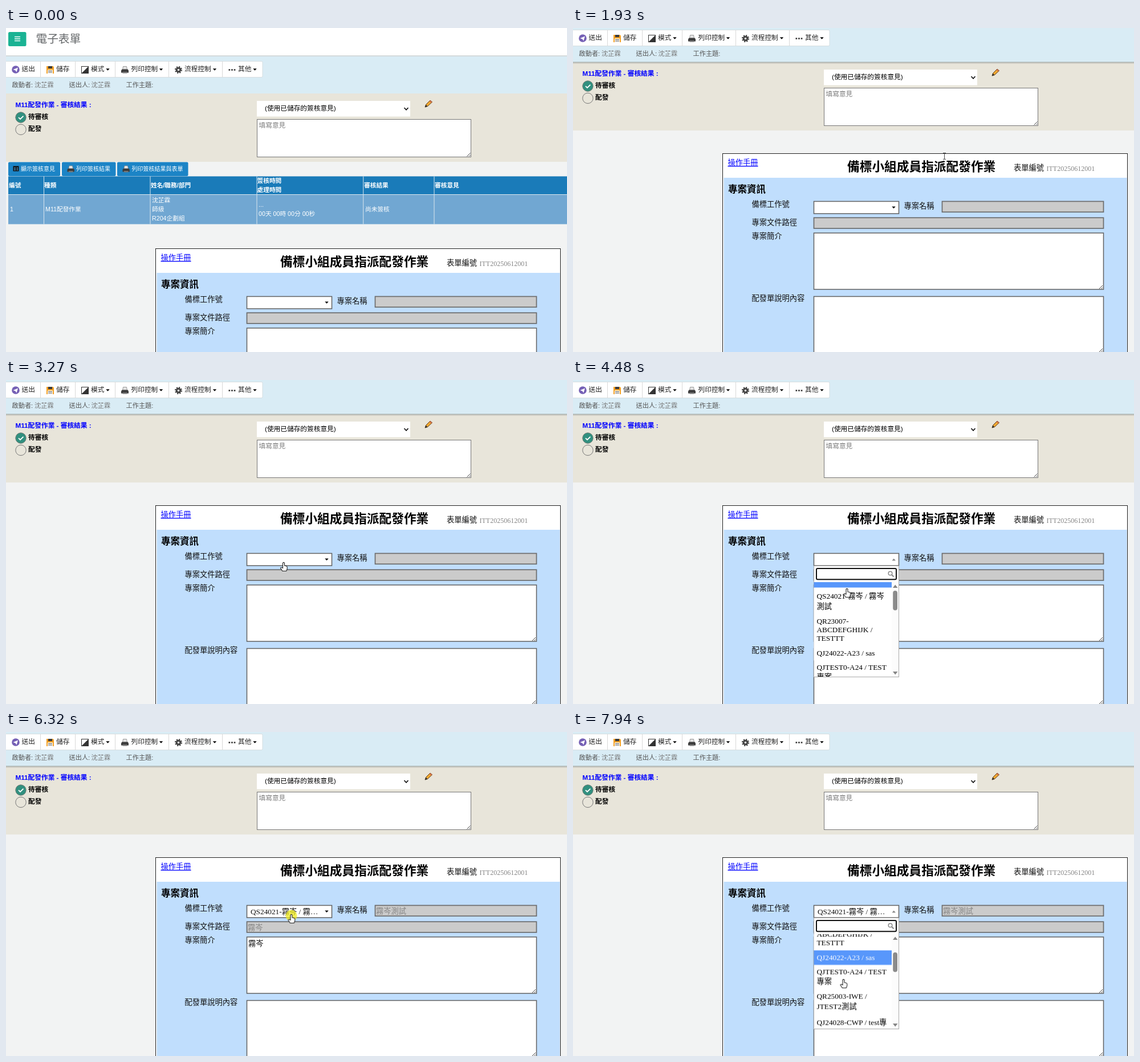
These frames come from a looping animation (984x569 px, 8000 ms). An HTML page:

```html
<!DOCTYPE html>
<html lang="zh-Hant">
<head>
<meta charset="utf-8">
<title>電子表單</title>
<style>
html,body{margin:0;width:100%;height:100%;overflow:hidden;background:#f2f3f3}
svg{display:block}
#stage{width:100vw;height:100vh}
text{font:11.7px "Liberation Sans","Noto Sans CJK TC","Noto Sans CJK SC","Noto Sans CJK JP","Noto Sans CJK",sans-serif;fill:#222;white-space:pre}
.b text,text.b{font-weight:700}
.head text{transform:translateY(-.5px)}
.info text{font-size:11.2px;fill:#555}
.info .name{fill:#777}
.small text{font-size:10px;fill:#fff}
.cells text{font-size:10.7px;fill:#fff}
.form text{font-size:13.25px;fill:#111}
.form .serif,.list text{font-size:13.3px;font-family:"Liberation Serif","Noto Sans CJK TC","Noto Sans CJK SC","Noto Sans CJK JP","Noto Sans CJK",serif}
.form .faint{fill:#858585;font-weight:300}
.field{fill:#fff;stroke:#626262;stroke-width:1.5}
.locked{fill:#cbcbcb;stroke:#6c6c6c;stroke-width:1.7}
.line{fill:none;stroke:#4a4a4a}
.row rect{fill:var(--bg,#fff)}
.row text{fill:var(--ink,#000)}

/* 1% is 80 ms */
.page,.head,.cursor,.scroll,.thumb{animation:8s linear infinite}
.page{animation-name:page}
.head{animation-name:head}
.cursor{animation-name:cursor}
.scroll{animation-name:scroll}
.thumb{animation-name:thumb}
.shadow,.menu,.picked,.filled,.arrow,.beam,.hand,.click,.row{animation:8s step-end infinite}
.shadow{animation-name:stuck}
.menu{animation-name:menu}
.picked{animation-name:picked}
.filled{animation-name:filled}
.arrow{animation-name:arrow}
.beam{animation-name:beam}
.hand{animation-name:hand}
.click{animation-name:click}
.r1{animation-name:r1}
.r2{animation-name:r2}
.r3{animation-name:r3}
.r4{animation-name:r4}

@keyframes page{
  0%,16.25%{transform:translateY(0);animation-timing-function:ease-in-out}
  18.25%,19.2%{transform:translateY(-80px)}
  19.25%,21.2%{transform:translateY(-83px);animation-timing-function:ease-in-out}
  24.125%,100%{transform:translateY(-167px)}
}
@keyframes head{
  0%,16.25%{transform:translateY(0);animation-timing-function:ease-in-out}
  18.25%,19.24%{transform:translateY(-80px)}
  19.25%,100%{transform:translateY(-55px)}
}
@keyframes cursor{
  0%,2.5%{transform:translate(624px,17px)}
  4.875%,6.4%{transform:translate(645px,197px)}
  7.375%,10.5%{transform:translate(650px,197px)}
  15%,27.2%{transform:translate(651px,225px)}
  32.25%,34.5%{transform:translate(590px,262px)}
  40.875%,41.6%{transform:translate(487px,320px)}
  43.375%,52.5%{transform:translate(486px,317px)}
  56%,56.8%{transform:translate(480.5px,366px)}
  57.625%,66.7%{transform:translate(479px,387px)}
  70.875%,74.1%{transform:translate(491px,366px)}
  74.125%,76.4%{transform:translate(494px,327px)}
  77.25%,85.6%{transform:translate(500.5px,320px)}
  88.5%,89.2%{transform:translate(497px,340px)}
  96.25%,100%{transform:translate(474.5px,434px)}
}
@keyframes scroll{
  0%,96.25%{transform:translateY(0);animation-timing-function:ease-in-out}
  99.25%,100%{transform:translateY(-83.5px)}
}
@keyframes thumb{
  0%,96.25%{transform:translateY(0);animation-timing-function:ease-in-out}
  99.25%,100%{transform:translateY(17px)}
}
@keyframes stuck{0%{opacity:0}19.25%,100%{opacity:1}}
@keyframes menu{0%{opacity:0}46.75%{opacity:1}61.875%{opacity:0}80.625%,100%{opacity:1}}
@keyframes picked{0%{opacity:0}61.875%,100%{opacity:1}}
@keyframes filled{0%{opacity:0}67.625%,100%{opacity:1}}
@keyframes arrow{0%{opacity:0}2.5%{opacity:1}4.4%{opacity:0}27.375%{opacity:1}39.4%{opacity:0}74.125%{opacity:1}76.5%,100%{opacity:0}}
@keyframes beam{0%{opacity:0}4.4%{opacity:1}27.375%{opacity:0}61.875%{opacity:1}74.125%{opacity:0}87.5%{opacity:1}90.4%,100%{opacity:0}}
@keyframes hand{0%{opacity:0}39.4%{opacity:1}61.875%{opacity:0}76.5%{opacity:1}87.5%{opacity:0}90.4%,100%{opacity:1}}
@keyframes click{0%{opacity:0}44.875%{opacity:1}47.5%{opacity:0}60.125%{opacity:1}62%{opacity:0}79%{opacity:1}80.7%,100%{opacity:0}}
@keyframes r1{0%{--bg:#5897fb}56.875%{--bg:#ddd}62.5%,100%{--bg:#fff}}
@keyframes r2{0%{--bg:#fff;--ink:#000}56.875%{--bg:#5897fb;--ink:#fff}93.75%,100%{--bg:#ddd;--ink:#000}}
@keyframes r3{0%{--bg:#fff;--ink:#000}93.75%{--bg:#5897fb;--ink:#fff}97.5%,100%{--bg:#fff;--ink:#000}}
@keyframes r4{0%{--bg:#fff;--ink:#000}97.5%,100%{--bg:#5897fb;--ink:#fff}}
</style>
</head>
<body>
<svg id="stage" viewBox="0 0 984 569">
<defs>
  <clipPath id="listClip"><rect x="422.5" y="355" width="149" height="166"/></clipPath>
  <linearGradient id="fade" x2="0" y2="1"><stop stop-color="#8b9290" stop-opacity=".75"/><stop offset="1" stop-color="#999" stop-opacity="0"/></linearGradient>
  <g id="printer">
    <path d="M3.5 .5H9.5L10.5 6H2.5Z" fill="#e4e4e4" stroke="#777" stroke-width=".7"/>
    <path d="M1.5 5.500H11.500L13 7.500V11.500H0V7.500Z" fill="#3c3c3c"/>
    <path d="M2.500 10H10.500V12.500H2.500Z" fill="#777"/>
  </g>
  <path id="caret" d="M-3.2 -1.7H3.2L0 1.7Z"/>
  <path id="grip" d="M-7 -1L-1 -7M-3.5 -1L-1 -3.5" stroke="#444" fill="none"/>
</defs>

<g class="page">
  <!-- review history -->
  <g fill="#1c84c6">
    <rect x="4" y="235.500" width="91" height="24.500" rx="2"/>
    <rect x="98" y="235.500" width="94.500" height="24.500" rx="2"/>
    <rect x="195" y="235.500" width="124.500" height="24.500" rx="2"/>
  </g>
  <rect x="12.500" y="242.500" width="10" height="9" fill="#111"/>
  <path d="M14 246H17M18.500 246H21M14 249H17M18.500 249H21" stroke="#5aa6d8" stroke-width="1.300"/>
  <use href="#printer" transform="translate(107.500 241.500)scale(.95)"/>
  <use href="#printer" transform="translate(204.500 241.500)scale(.95)"/>
  <g class="small">
    <text x="26" y="250.700">顯示簽核意見</text>
    <text x="123" y="250.700">列印簽核結果</text>
    <text x="220.500" y="250.700">列印簽核結果與表單</text>
  </g>
  <rect x="4" y="260.500" width="980" height="32" fill="#1a7bb9"/>
  <rect x="4" y="292" width="980" height="52.500" fill="#71a7d2"/>
  <path d="M4 292.500H984M66.500 260.500V344.500M253 260.500V344.500M440 260.500V344.500M626.700 260.500V344.500M751 260.500V344.500" stroke="#dde7ee"/>
  <g class="cells b">
    <text x="5" y="280">編號</text><text x="67" y="280">種類</text>
    <text x="254" y="280">姓名/職務/部門</text>
    <text x="440.500" y="272">簽核時間</text><text x="440.500" y="287.500">處理時間</text>
    <text x="628" y="280">審核結果</text><text x="752" y="280">審核意見</text>
  </g>
  <g class="cells">
    <text x="7" y="322">1</text><text x="69" y="322">M11配發作業</text>
    <text x="256" y="306">沈芷霖</text><text x="256" y="322">師級</text><text x="256" y="337.500">R204企劃組</text>
    <text x="443" y="314">...</text><text x="443" y="329.500">00天 00時 00分 00秒</text>
    <text x="630" y="322">尚未簽核</text>
  </g>

  <!-- form -->
  <g class="form">
    <rect x="262.500" y="387.500" width="710" height="420" fill="#fff" stroke="#222"/>
    <rect x="264.500" y="430" width="707" height="380" fill="#c0defd"/>
    <text x="271.500" y="408" style="fill:#00f" text-decoration="underline">操作手冊</text>
    <text class="b" x="481" y="417.700" style="font-size:21.7px;fill:#000">備標小組成員指派配發作業</text>
    <text x="773" y="417">表單編號</text>
    <text class="serif faint" x="830.500" y="417.500" style="font-size:12px">ITT20250612001</text>
    <text class="b" x="272" y="456" style="font-size:16.5px;fill:#000">專案資訊</text>
    <text x="313.500" y="481">備標工作號</text>
    <text x="580.500" y="484">專案名稱</text>
    <text x="313.500" y="513">專案文件路徑</text>
    <text x="313.500" y="537">專案簡介</text>
    <text x="313.500" y="646">配發單說明內容</text>
    <rect class="field" x="422.500" y="471.500" width="149" height="21.500"/>
    <use href="#caret" x="562.500" y="482.300"/>
    <rect class="locked" x="647.500" y="471.500" width="283" height="18.700"/>
    <rect class="locked" x="422.500" y="500.200" width="508" height="18.700"/>
    <rect class="field" x="422.500" y="527" width="508" height="99"/>
    <rect class="field" x="422.500" y="638.500" width="508" height="98.500"/>
    <use href="#grip" x="930" y="626"/><use href="#grip" x="930" y="737"/>
    <text class="serif picked" x="429" y="487">QS24021-霧岑 / 霧…</text>
    <g class="filled">
      <text class="faint" x="649" y="486">霧岑測試</text>
      <text class="faint" x="424" y="515">霧岑</text>
      <text x="425" y="543">霧岑</text>
    </g>
  </g>
</g>

<g class="head">
  <rect width="984" height="49" fill="#fff"/>
  <rect y="48" width="984" height="2.500" fill="#d5dadc"/>
  <rect y="50" width="984" height="65" fill="#d9ecf5"/>
  <rect y="115" width="984" height="120" fill="#e8e5da"/>
  <rect class="shadow" y="114.500" width="984" height="4" fill="url(#fade)"/>
  <rect x="4" y="7" width="31.500" height="25" rx="2.500" fill="#1ab394"/>
  <path d="M15 15.500H25M15 19H25M15 22.500H25" stroke="#fff" stroke-width="1.700"/>
  <text x="52.500" y="26.500" style="font-size:19.700px;font-weight:300;fill:#676a6c">電子表單</text>

  <!-- toolbar -->
  <rect x="-2" y="58.500" width="452" height="28" rx="2" fill="#fff" stroke="#d6dde0"/>
  <path d="M60.500 59V86M121.500 59V86M191.500 59V86M285.500 59V86M379.500 59V86" stroke="#d8d8d8"/>
  <circle cx="17" cy="73" r="6.800" fill="#7560b5"/>
  <path d="M12.500 73L21 69.500L18.500 77.500L16.500 74.500Z" fill="#fff"/>
  <path d="M71 67H82.500L84 68.500V80H71Z" fill="#f2a024"/>
  <path d="M74 67H81V71H74Z" fill="#3a3a3a"/>
  <path d="M73 73.500H82V80H73Z" fill="#fff"/>
  <path d="M74 75.500H81M74 78H81" stroke="#555"/>
  <rect x="132.500" y="67.500" width="12" height="12" fill="#fff" stroke="#333"/>
  <path d="M144.500 67.500V79.500H132.500Z" fill="#333"/>
  <use href="#printer" transform="translate(202 67)"/>
  <circle cx="302.500" cy="73.500" r="5.300" fill="none" stroke="#444" stroke-width="2.500" stroke-dasharray="2.100 2.060"/>
  <circle cx="302.500" cy="73.500" r="3.300" fill="none" stroke="#444" stroke-width="3"/>
  <path d="M390.500 73.500H402.500" stroke="#333" stroke-width="2.700" stroke-dasharray="2.700 1.900"/>
  <text x="27.500" y="76.300">送出</text><text x="88" y="76.300">儲存</text>
  <text x="149" y="76.300">模式</text><text x="219.500" y="76.300">列印控制</text>
  <text x="313" y="76.300">流程控制</text><text x="407" y="76.300">其他</text>
  <use href="#caret" x="178.500" y="73"/><use href="#caret" x="272" y="73"/>
  <use href="#caret" x="366" y="73"/><use href="#caret" x="436.500" y="73"/>
  <g class="info">
    <text x="10.500" y="104.500">啟動者:</text><text class="name" x="50" y="104.500">沈芷霖</text>
    <text x="110.500" y="104.500">送出人:</text><text class="name" x="149.500" y="104.500">沈芷霖</text>
    <text x="210.500" y="104.500">工作主題:</text>
  </g>

  <!-- review panel -->
  <text class="b" x="16.500" y="139.300" style="fill:#00f">M11配發作業 - 審核結果 :</text>
  <circle cx="26" cy="157" r="9.200" fill="#31907f" stroke="#66756e"/>
  <path d="M22 157.200L25 160L30.500 154.700" fill="none" stroke="#fff" stroke-width="1.800"/>
  <circle cx="26" cy="178.300" r="9.200" fill="#e8e5da" stroke="#777"/>
  <text class="b" x="39" y="160.300" style="fill:#000">待審核</text>
  <text class="b" x="39" y="181.500" style="fill:#000">配發</text>
  <rect x="440" y="128" width="269" height="27.500" fill="#fff"/>
  <text x="454" y="145.600" style="fill:#000">(使用已儲存的簽核意見)</text>
  <path d="M698.500 140L702 143.800L705.500 140" fill="none" stroke="#111" stroke-width="1.700"/>
  <rect x="440.500" y="160.500" width="375" height="66" fill="#fff" stroke="#777"/>
  <use href="#grip" x="815.500" y="226.500"/>
  <text x="443.500" y="175.300" style="fill:#7d7d7d">填寫意見</text>
  <path d="M735 139L736.500 134.500L744 127L747.500 130L739.500 137.500Z" fill="#f5a832" stroke="#5a3a12"/>
  <path d="M735 139L736.500 134.500L739.500 137.500Z" fill="#333"/>
  <path d="M742.500 128.500L744 127L747.500 130L746 131.500Z" fill="#c96a4a"/>
</g>

<!-- project picker -->
<g class="menu">
  <rect x="556" y="309" width="14" height="13" fill="#fff"/>
  <path d="M559.500 317.200H566L562.700 313.500Z" fill="#888"/>
  <rect x="422.500" y="326.500" width="149" height="195" fill="#fff" stroke="#aaa"/>
  <rect x="427" y="331" width="140" height="19.300" rx="2" fill="#fff" stroke="#111" stroke-width="2"/>
  <circle cx="556.500" cy="339.500" r="3.300" fill="none" stroke="#888" stroke-width="1.500"/>
  <path d="M559 342L562.500 345.500" stroke="#888" stroke-width="2"/>
  <g class="list" clip-path="url(#listClip)">
    <g class="scroll">
      <g class="row r1"><rect x="422.500" y="355" width="136.500" height="9.700"/></g>
      <g class="row r2"><rect x="422.500" y="364.700" width="136.500" height="46.300"/>
        <text x="427.500" y="384">QS24021-霧岑 / 霧岑</text><text x="427.500" y="401.800">測試</text></g>
      <g class="row r3"><rect x="422.500" y="411" width="136.500" height="56"/>
        <text x="427.500" y="427.500">QR23007-</text><text x="427.500" y="443">ABCDEFGHIJK /</text><text x="427.500" y="458">TESTTT</text></g>
      <g class="row r4"><rect x="422.500" y="467" width="136.500" height="25.500"/>
        <text x="427.500" y="483.500">QJ24022-A23 / sas</text></g>
      <g class="row">
        <text x="427.500" y="509">QJTEST0-A24 / TEST</text><text x="427.500" y="526.300">專案</text>
        <text x="427.500" y="552">QR25003-IWE /</text><text x="427.500" y="570">JTEST2測試</text>
        <text x="427.500" y="598">QJ24028-CWP / test專</text></g>
    </g>
  </g>
  <rect x="559" y="355" width="12" height="166" fill="#fcfcfc"/>
  <path d="M561 365H569.500L565.200 359.500ZM561 512H569.500L565.200 517.500Z" fill="#858585"/>
  <rect class="thumb" x="561.200" y="370" width="7.800" height="34.500" rx="3.900" fill="#8b8b8b"/>
</g>

<g class="cursor">
  <circle class="click" cy="2.500" r="10" fill="#f0ec1c" fill-opacity=".75"/>
  <path class="arrow" d="M.5 .5V12.500L3.300 10L5 14L6.800 13.200L5.200 9.400H9Z" fill="#fff" stroke="#222" stroke-width=".9"/>
  <path class="beam line" d="M-2 -5.500H3M.5 -5.500V5.500M-2 5.500H3"/>
  <path class="hand" d="M-1.500 1.500Q0 -.7 1.500 1.500V6Q5.800 6.300 6.200 8.500V11.500L4.800 15.500H-2.200L-5.400 10.300Q-5 7.800 -1.500 10.300Z" fill="#fff" stroke="#222" stroke-width="1.100"/>
</g>
</svg>
</body>
</html>
```
